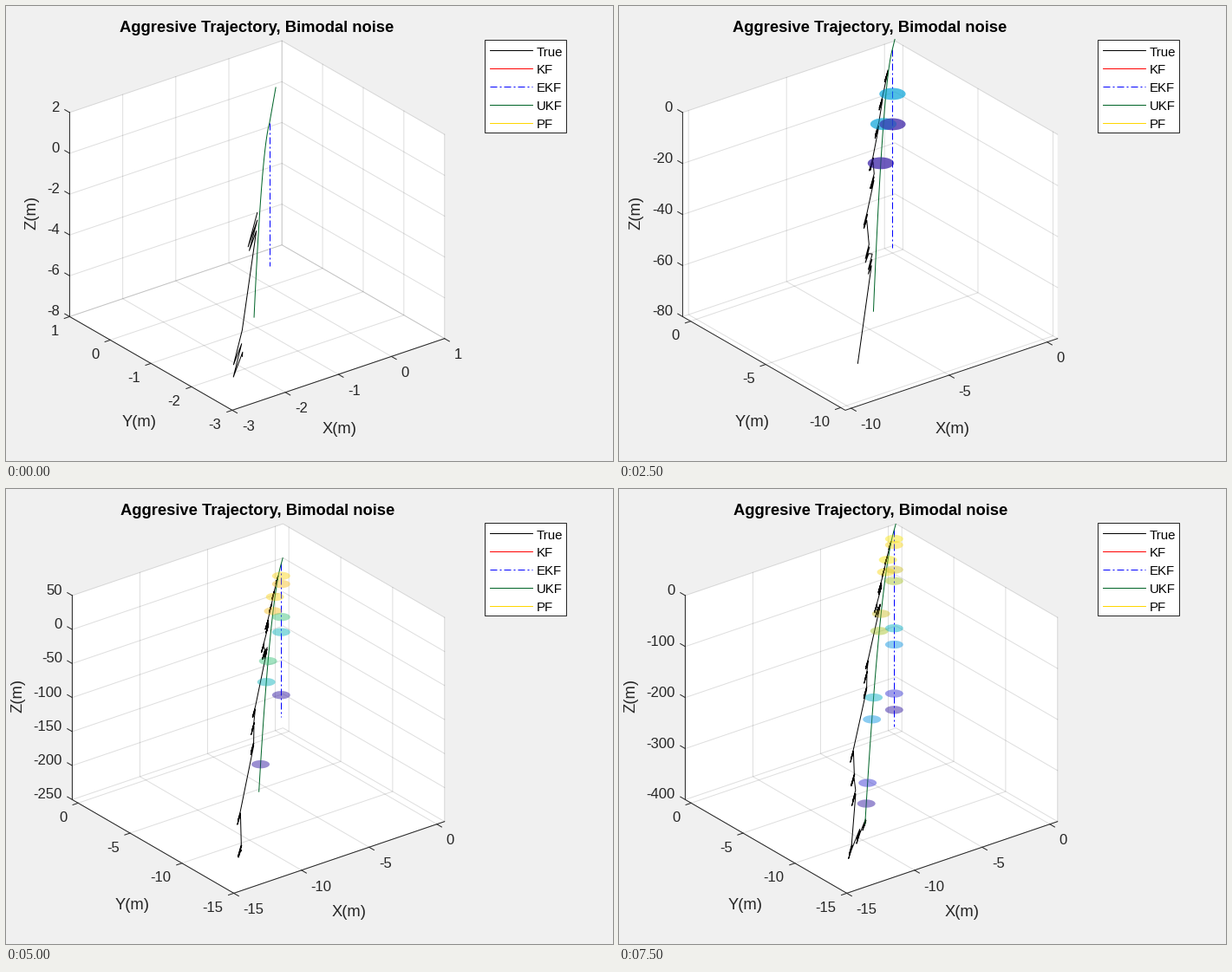
Write a matplotlib script that moves like this. It is 700 px wide and 525 px high and loops after 8 s.

```python
import numpy as np
import matplotlib.pyplot as plt
from matplotlib.animation import FuncAnimation
from matplotlib.colors import LinearSegmentedColormap
from matplotlib.patches import Polygon, Rectangle

W, H, DPI, STEPS = 700, 525, 100, 16
PX = 72 / DPI                      # points per pixel
INK, BLUE, GREEN = "#262626", "#0000ff", "#006428"
DASHDOT = (0, (8, 3, 2, 3))
BLOB_R = .53
plt.rcParams["font.family"] = "Liberation Sans"

parula = LinearSegmentedColormap.from_list("parula", [
    (.242, .150, .660), (.281, .323, .958), (.179, .529, .968),
    (.069, .695, .839), (.216, .784, .592), (.672, .779, .223),
    (.997, .766, .220), (.977, .984, .081)])

# first step of each view: xy limits, xy tick spacing, z maximum
VIEWS = {0: (-3, 1, 1, 2), 1: (-6, .57, 2, .65), 2: (-6, 2, 2, .65),
         4: (-6, .57, 2, .65), 5: (-10.3, .53, 5, 0), 8: (-15, .57, 5, 0),
         10: (-15, .57, 5, 50), 11: (-15, .57, 5, 0)}

# where the true track wobbles, as (x = y, z)
KNOTS = [(-1.4, -2.4), (-2.5, -5.7), (-3.4, -11), (-4.6, -17), (-4.4, -25),
         (-5.9, -31), (-5.5, -46), (-4.9, -54), (-8.6, -82), (-9, -99),
         (-9.2, -126), (-13.3, -162), (-13.1, -215), (-12.8, -256),
         (-13.9, -337), (-11.4, -360), (-9.4, -379)]


def depth_at(n):
    """Fall speeds up for nine steps, then stays constant."""
    t = min(n, 9)
    return 7 + 10.2 * t + .35 * t**2 + .09 * t**3 + 32 * max(n - 9, 0)


def make_true_track():
    rng = np.random.default_rng(4)
    pts = []
    for d, z in KNOTS:
        root = np.sqrt(-z)
        for k in range(5):
            swing = (.4 + .015 * root) * rng.uniform(.5, 1)
            pts.append((d + (-1) ** k * swing, z - .12 * k * root))
    return np.array(pts)


TRUE = make_true_track()


def true_until(depth):
    d, z = TRUE[TRUE[:, 1] > -depth].T
    end = np.interp(depth, -TRUE[:, 1], TRUE[:, 0])
    return np.append(d, end), np.append(z, -depth)


def drift(z):
    """Horizontal offset of the UKF track at height z."""
    return np.where(z > 0, .7 * z, -.47 * np.sqrt(np.abs(z)))


class Box:
    """Orthographic view of the axes box, in pixels."""

    def __init__(self, lo, hi, zlo, zhi, wide):
        self.lo, self.zlo = lo, zlo
        left = np.array([76 if wide else 73, 358.])
        self.front = np.array([262.3 if wide else 260.5, 466.])
        self.ex = np.array([505.3, 383.3]) - self.front
        self.ey = left - self.front
        self.ez = np.array([0, -235.5])
        self.span, self.zspan = hi - lo, zhi - zlo

    def at(self, u, v, w):
        return self.front + u * self.ex + v * self.ey + w * self.ez

    def track(self, d, z):
        s = ((np.asarray(d, float) - self.lo) / self.span)[:, None]
        w = ((np.asarray(z, float) - self.zlo) / self.zspan)[:, None]
        return self.at(s, s, w)

    def blob(self, d, z):
        """Outline of an ellipsoid centred at (d, d, z)."""
        m = BLOB_R * np.column_stack([self.ex / self.span, self.ey / self.span,
                                      self.ez / self.zspan])
        t = np.linspace(0, 2 * np.pi, 60)
        ring = np.linalg.cholesky(m @ m.T) @ [np.cos(t), np.sin(t)]
        return self.track([d], [z]) + ring.T


fig = plt.figure(figsize=(W / DPI, H / DPI), dpi=DPI, facecolor="#f0f0f0")
ax = fig.add_axes([0, 0, 1, 1])


def line(pts, color=INK, width=1, **kw):
    pts = np.asarray(pts)
    ax.plot(pts[:, 0], pts[:, 1], color=color, lw=width * PX, **kw)


def text(x, y, s, size=16.67, color=INK, **kw):
    ax.text(x, y, s, fontsize=size * PX, color=color, **kw)


def ticks(lo, hi, step):
    return np.arange(np.ceil(lo / step - 1e-6) * step, hi + 1e-6, step)


def draw_axes(box, lo, hi, zlo, zhi, step, zstep):
    hull = [(0, 0, 0), (1, 0, 0), (1, 0, 1), (1, 1, 1), (0, 1, 1), (0, 1, 0)]
    ax.add_patch(Polygon([box.at(*c) for c in hull], fc="white", ec="none"))
    grid = dict(color=INK, alpha=.15)
    unit = lambda v: 6.5 * v / np.hypot(*v)
    out_x, out_y, out_z = unit(-box.ey), unit(-box.ex), unit(box.ey)

    for t in ticks(lo, hi, step):
        s = (t - lo) / (hi - lo)
        line([box.at(s, 0, 0), box.at(s, 1, 0), box.at(s, 1, 1)], **grid)
        line([box.at(0, s, 0), box.at(1, s, 0), box.at(1, s, 1)], **grid)
        p, q = box.at(s, 0, 0), box.at(0, s, 0)
        line([p, p + out_x])
        line([q, q + out_y])
        text(p[0] + 11, p[1] + 23.7, f"{t:.0f}")
        text(q[0] - 12.5, q[1] + 21.7, f"{t:.0f}", ha="right")
    for t in ticks(zlo, zhi, zstep):
        w = (t - zlo) / (zhi - zlo)
        line([box.at(0, 1, w), box.at(1, 1, w), box.at(1, 0, w)], **grid)
        p = box.at(0, 1, w)
        line([p, p + out_z])
        text(p[0] - 11.5, p[1] - 1, f"{t:.0f}", ha="right")
    line([box.at(0, 1, 1), box.at(0, 1, 0), box.at(0, 0, 0), box.at(1, 0, 0)])


def draw_titles(zlo, wide):
    text(290 if wide else 289, 30, "Aggresive Trajectory, Bimodal noise",
         18.33, "black", weight="bold", ha="center")
    text(395 if wide else 384, 492.5, "X(m)", 18.33, ha="center")
    text(145 if wide else 153, 485, "Y(m)", 18.33, ha="center")
    zx = (29, 19, 13)[len(f"{zlo:.0f}") - 2]
    text(zx, 238.5, "Z(m)", 18.33, rotation=90, ha="center", va="center")


def draw_legend():
    ax.add_patch(Rectangle((552, 39), 94, 107, fc="white", ec=INK, lw=PX))
    rows = [("True", "black", "-"), ("KF", "red", "-"), ("EKF", BLUE, DASHDOT),
            ("UKF", GREEN, "-"), ("PF", "#ffd700", "-")]
    for i, (name, color, style) in enumerate(rows):
        y = 51 + 20.8 * i
        line([(558, y), (607, y)], color, ls=style)
        text(611, y + 6.3, name, 15, "black")


def draw_blobs(box, n, alpha):
    # a pair on two steps out of every four, shown one step later
    zs = [-depth_at(k) for k in range(n) if k % 4 in (1, 2)]
    for z in zs:
        color = parula(1 - z / min(zs))
        for d in (0, drift(z)):
            ax.add_patch(Polygon(box.blob(d, z), fc=color, ec="none",
                                 alpha=alpha, zorder=2))


def draw(n):
    ax.clear()
    # just under half a pixel, so that snapping rounds to the right pixel
    ax.set(xlim=(-.4, W - .4), ylim=(H - .4, -.4))
    ax.axis("off")

    depth = depth_at(n)
    lo, hi, step, zhi = VIEWS[max(k for k in VIEWS if k <= n)]
    zstep = next(s for s in (2, 5, 10, 20, 50, 100) if depth <= 6 * s)
    zlo = -np.ceil(depth / zstep) * zstep
    wide = zlo <= -100
    box = Box(lo, hi, zlo, zhi, wide)

    draw_axes(box, lo, hi, zlo, zhi, step, zstep)
    draw_titles(zlo, wide)
    draw_legend()

    # front and back shells of each ellipsoid enclose the tracks
    alpha = .5 if n < 8 else .3
    draw_blobs(box, n, alpha)
    z = np.append(.72, -depth * np.linspace(0, 1, 80) ** 2)
    line(box.track([0, 0], [0, -depth]), BLUE, ls=DASHDOT, zorder=2)
    line(box.track(*true_until(depth)), "black", zorder=2)
    line(box.track(drift(z), z), GREEN, zorder=2)
    draw_blobs(box, n, alpha)


anim = FuncAnimation(fig, draw, frames=STEPS, init_func=lambda: [],
                     interval=500, repeat=True, repeat_delay=0)
plt.show()
```
